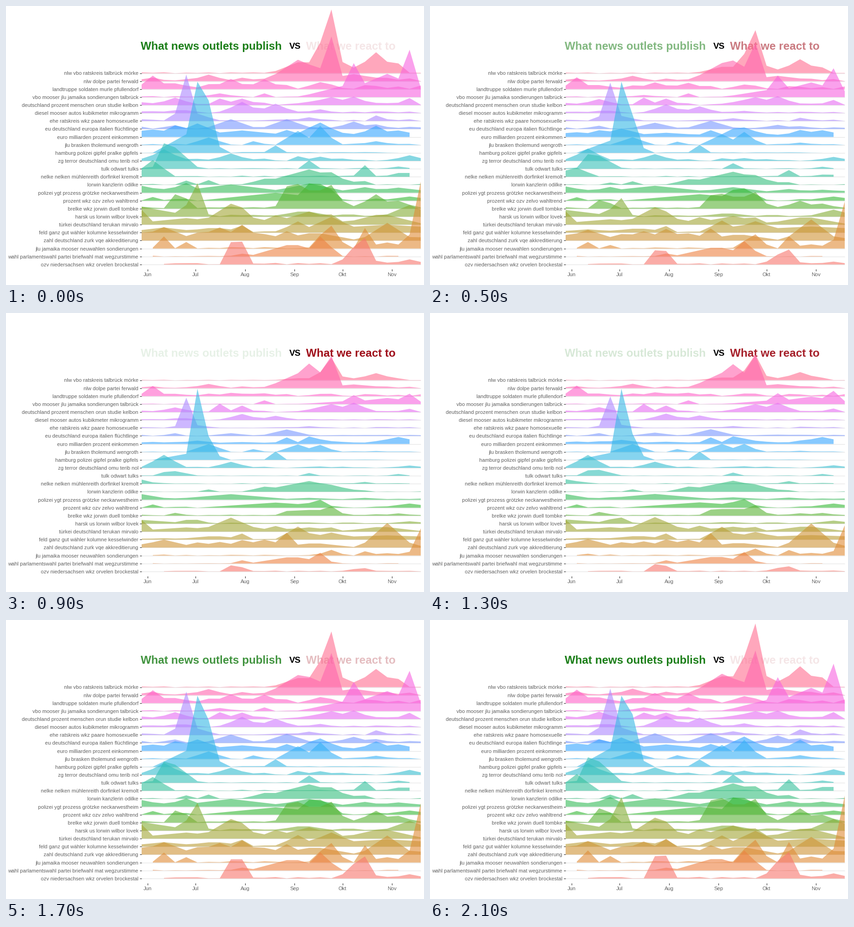
A matplotlib script that plays this animation: 900x600 px, repeating every 2200 ms.

```python
import matplotlib.pyplot as plt
import numpy as np
from matplotlib.animation import FuncAnimation

W, H, DPI = 900, 600, 100
LEFT, RIGHT, TOP = 292, 893, 144.5
WEEKS, ROW, ROWS = 26, 17.14, 25
STEP = (RIGHT - LEFT) / (WEEKS - 1)
FRAMES, TURN = 22, 10
PT = 72 / DPI
GREY, DARK = "#636363", "#333333"

rng = np.random.default_rng(4)
plt.rcParams["font.family"] = "Liberation Sans"
fig = plt.figure(figsize=(W / DPI, H / DPI), dpi=DPI, facecolor="white")
ax = fig.add_axes([0, 0, 1, 1])
ax.set(xlim=(0, W), ylim=(H, 0))
ax.axis("off")


def hcl(hue, chroma=100, lum=65, floor=0.035):
    """Polar LUV colour to sRGB; the floor softens out-of-gamut channels."""
    a = np.radians(hue)
    u = chroma * np.cos(a) / (13 * lum) + 0.19783
    v = chroma * np.sin(a) / (13 * lum) + 0.46832
    y = ((lum + 16) / 116) ** 3
    x, z = 9 * y * u / (4 * v), y * (12 - 3 * u - 20 * v) / (4 * v)
    rgb = np.array([3.2405 * x - 1.5371 * y - 0.4985 * z,
                    -0.9693 * x + 1.8760 * y + 0.0416 * z,
                    0.0556 * x - 0.2040 * y + 1.0572 * z])
    return 1.055 * np.clip(rgb, floor, 1) ** (1 / 2.4) - 0.055


def line(xs, ys, color, width):
    ax.plot(xs, ys, color=color, lw=width * PT, solid_capstyle="butt", zorder=0)


def text(x, y, s, size, color, **kw):
    return ax.text(x, y, s, fontsize=size * PT, color=color, va="baseline", **kw)


def tent(week, published, reacted, reach=1):
    """A linear peak in both states, falling to zero `reach` weeks away."""
    shape = np.clip(1 - abs(np.arange(WEEKS) - week) / reach, 0, 1)
    return np.outer((published, reacted), shape)


ridges = []


def ridge(label, noise, *peaks, start=0, end=WEEKS):
    n = len(ridges)
    base = TOP + n * ROW
    text(285, base + 4, label, 11.1, GREY, ha="right")
    line([LEFT, RIGHT], [base, base], "#e0e0e0", 1)
    line([288, 291.5], [base, base], DARK, 1.2)
    floor = np.outer((noise, noise / 2), rng.random(WEEKS))
    heights = np.max([floor] + [tent(*p) for p in peaks], axis=0)[:, start:end]
    xs = LEFT + STEP * np.arange(start, end)
    color = hcl(15 + 360 / ROWS * (ROWS - 1 - n))
    area, = ax.fill(xs, xs * 0 + base, color=color, alpha=0.6, lw=0, zorder=5 + n)
    ridges.append((area, xs, base, heights))


# Each peak: week, height published, height reacted, reach in weeks.
ridge("nlw vbo ratskreis talbrück mörke", 2,
      (14.5, 28, 5, 3), (16, 66, 17), (17, 137, 48), (18, 24, 8, 2), (21, 45, 15, 2.2), (23, 21, 4))
ridge("nlw dolpe partei ferwald", 8,
      (6, 14, 9, 2), (14, 46, 32, 3), (15, 36, 53), (16, 28, 34), (17, 96, 69), (19, 15, 8, 4))
ridge("landtruppe soldaten murle pfullendorf", 11,
      (1, 29, 22), (2.5, 15, 6, 3), (8, 22, 7, 2), (11, 21, 6, 2), (16, 15, 3, 2))
ridge("vbo mooser jlu jamaika sondierungen talbrück", 3,
      (7, 8, 1, 2), (11, 8, 8), (18, 24, 6, 4), (19, 73, 19), (22, 50, 13, 5), (24, 102, 22))
ridge("deutschland prozent menschen orun studie kelbon", 8,
      (3, 16, 10, 2), (7, 14, 18), (9, 14, 14), (17, 17, 17, 3), (19, 18, 20, 2), (24, 15, 7))
ridge("diesel mooser autos kubikmeter mikrogramm", 4,
      (3.5, 8, 5, 2), (9, 24, 13, 2), (12, 20, 9, 2), (16, 8, 0))
ridge("ehe ratskreis wkz paare homosexuelle", 4,
      (3, 16, 4), (4, 100, 65), (5, 16, 6, 2), (15, 8, 4, 2), (21, 12, 2))
ridge("eu deutschland europa italien flüchtlinge", 5,
      (3, 8, 6), (8, 21, 6, 2.5), (13, 21, 14, 2.5), (19, 16, 1, 2), (21, 10, 2))
ridge("euro milliarden prozent einkommen", 9,
      (1, 16, 4, 6), (3, 25, 4), (5, 29, 7, 3), (9, 14, 4, 6), (13, 15, 14), (15, 20, 16),
      (16, 31, 10, 2.5), (21, 24, 6, 2), (23, 14, 15, 3), end=25)
ridge("jlu brasken tholemund wengroth", 3,
      (6, 16, 17, 2), (10, 8, 6), (14, 30, 16, 2), (16, 41, 15, 1.6), (21, 8, 2, 2))
ridge("hamburg polizei gipfel pralke gipfels", 2,
      (4, 40, 13, 3), (5, 153, 153), (6, 113, 51), (7, 13, 8), (12, 16, 18), end=24)
ridge("zg terror deutschland omu terib nol", 5,
      (2, 25, 28, 2), (8, 16, 13, 2), (14, 10, 0), (16, 9, 3, 2), (24, 12, 5, 2))
ridge("tulk odwart tulks", 2,
      (2, 55, 8), (3, 46, 10, 2.2), (15, 18, 6), (23, 5, 4), end=25)
ridge("nelke nelken mühlenreith dorfinkel kremolt", 3,
      (0, 9, 9), (1, 36, 3, 2), (20, 25, 4), (23.5, 11, 1, 2), end=25)
ridge("lorwin kanzlerin odilke", 2,
      (4, 9, 0), (6, 10, 5), (11, 13, 11, 2), (15, 33, 23, 5), (17, 27, 15), (20, 8, 3))
ridge("polizei ygt prozess grötzke neckarwestheim", 5,
      (0, 15, 12, 3), (3, 12, 3, 3), (4, 21, 1), (8, 18, 12, 6), (15, 20, 4, 4), (20, 12, 4, 3),
      (23, 11, 2, 4))
ridge("prozent wkz ozv zelvo wahltrend", 5,
      (1, 8, 7), (12, 17, 11, 7), (15, 37, 10), (16, 36, 17), (17, 24, 4), (24, 9, 9, 3))
ridge("brelke wkz jorwin duell tombke", 5,
      (3, 31, 6), (4, 22, 2), (13, 48, 10), (14, 53, 11), (15.5, 45, 14, 4), (17, 51, 20),
      (21, 31, 3, 2), (23, 17, 5, 2))
ridge("harsk us lorwin wilbor lovek", 5,
      (0, 21, 8, 5), (4, 25, 8), (5, 72, 8), (14.5, 13, 3, 3), (24, 25, 5, 2.5))
ridge("türkei deutschland terukan mirvalo", 6,
      (0, 32, 25), (4, 14, 9, 6), (8, 45, 30, 3), (9, 37, 19), (12, 20, 12, 2), (15, 28, 9, 4),
      (17, 22, 9), (21.5, 24, 11, 4))
ridge("feld ganz gut wähler kolumne kesselwinder", 5,
      (2, 11, 3, 4), (6.5, 11, 8, 4), (9, 15, 13), (14, 24, 28, 2), (17, 34, 15, 3), (22, 17, 9, 12))
ridge("zahl deutschland zurk vqe akkreditierung", 9,
      (0, 17, 7), (2, 29, 17, 3), (5, 17, 11), (7, 28, 12, 3), (9, 34, 16, 2), (11, 14, 17, 3),
      (13, 20, 32), (15.5, 18, 10, 4), (22, 38, 53, 2.5))
ridge("jlu jamaika mooser neuwahlen sondierungen", 3,
      (2, 26, 2), (4, 14, 0), (16, 29, 4), (17, 49, 12, 1.4), (20, 44, 9), (22, 13, 5, 3),
      (24, 30, 8), (25, 144, 58), start=1)
ridge("wahl parlamentswahl partei briefwahl mat wegzurstimme", 2,
      (9, 6, 7), (13.5, 28, 15, 4), (16, 43, 23), (17, 20, 4), start=1, end=24)
ridge("ozv niedersachsen wkz orvelen brockestal", 4,
      (8, 48, 13), (9, 49, 9), (19, 38, 5, 1.4), (20, 57, 7), (21, 8, 1, 2), (24, 11, 0, 2), start=2)

for x, month in zip((305, 408, 515, 621, 724.5, 831), "Jun Jul Aug Sep Okt Nov".split()):
    line([x, x], [566, 570], DARK, 1.2)
    text(x, 581, month, 11.1, GREY, ha="center")

publish = text(290, 94, "What news outlets publish", 24.1, "#1b7e18", weight="bold")
react = text(646, 94, "What we react to", 24.2, "#9f0f1a", weight="bold")
text(609.5, 92, "VS", 18.8, "black", weight="bold")


def ease(t):
    return 4 * t ** 3 if t < 0.5 else 1 - 4 * (1 - t) ** 3


def update(i):
    p = ease(i / TURN if i <= TURN else (FRAMES - 1 - i) / (FRAMES - 1 - TURN))
    for area, xs, base, (a, b) in ridges:
        ys = base - (a + (b - a) * p)
        area.set_xy(np.column_stack([np.r_[xs[0], xs, xs[-1]], np.r_[base, ys, base]]))
    publish.set_alpha(1 - 0.9 * p)
    react.set_alpha(0.1 + 0.9 * p)


anim = FuncAnimation(fig, update, frames=FRAMES, interval=100, repeat=True,
                     repeat_delay=0, cache_frame_data=False)
plt.show()
```
